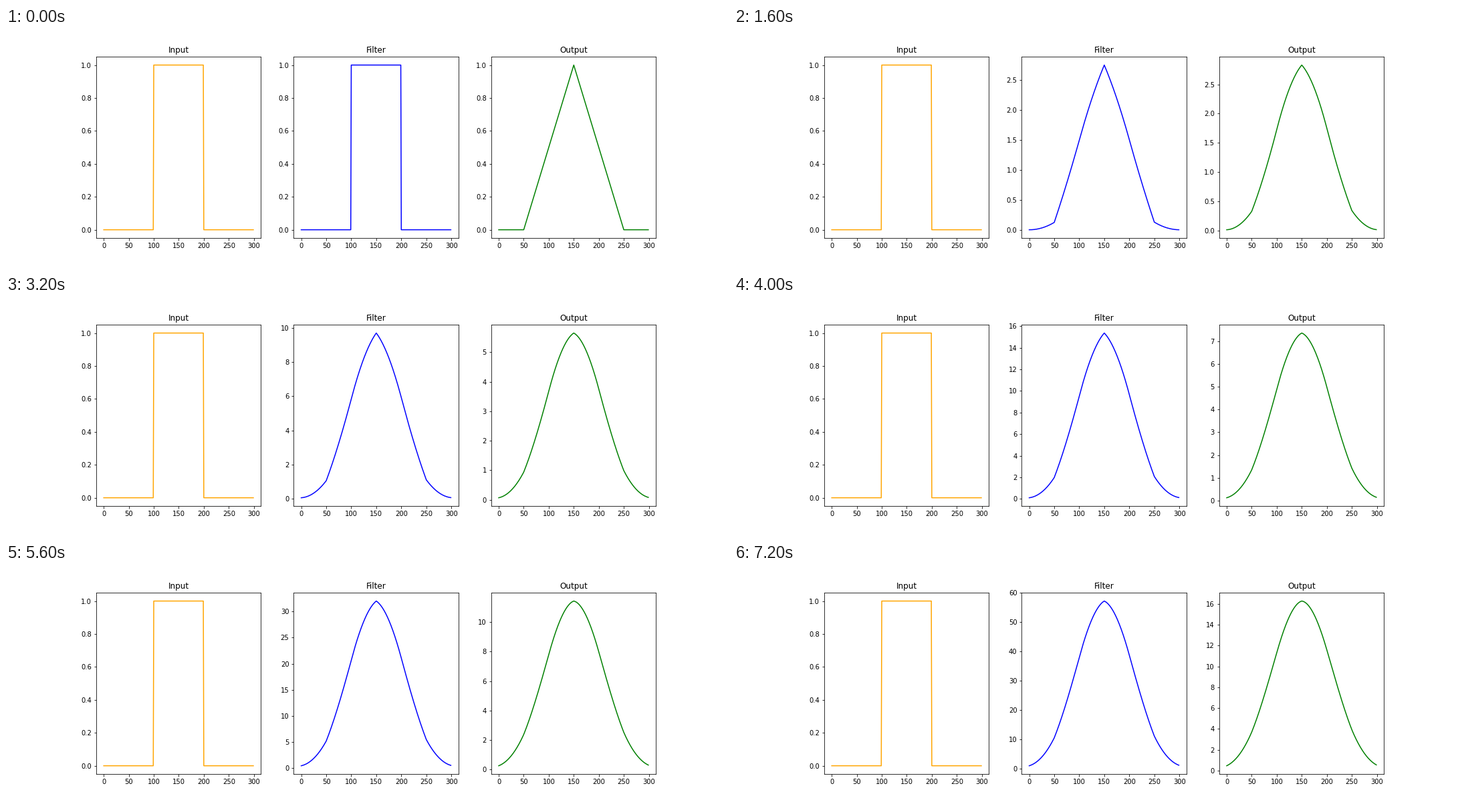
These frames come from a looping animation (1080 px wide and 360 px high, 8 s). A matplotlib script:

```python
import matplotlib.pyplot as plt
import numpy as np
from matplotlib.animation import FuncAnimation

STEPS = 10
STEP_MS = 800
SIZE = 300

plt.rcParams.update({
    "font.family": "DejaVu Sans",
    "font.size": 10,
    "figure.subplot.bottom": 0.125,
})


def build_steps(signal):
    """Return (filter, output) pairs of the accumulating convolution."""
    kernel = signal
    output = np.convolve(signal, kernel, "same") / kernel.sum()
    steps = [(kernel, output)]
    kernel = np.zeros(SIZE)
    while len(steps) < STEPS:
        kernel = kernel + output
        output = output + np.convolve(signal, kernel, "same") / output.sum()
        steps.append((kernel, output))
    return steps


x = np.arange(SIZE)
box = np.where((x >= 100) & (x < 200), 1.0, 0.0)
steps = build_steps(box)

fig, axes = plt.subplots(1, 3, figsize=(15, 5), dpi=72)
lines = []
for ax, title, color in zip(axes, ("Input", "Filter", "Output"),
                            ("orange", "blue", "green")):
    ax.set_title(title)
    lines += ax.plot(x, box, color=color)


def update(index):
    for ax, line, values in zip(axes[1:], lines[1:], steps[index]):
        line.set_ydata(values)
        ax.relim()
        ax.autoscale_view()
    return lines


animation = FuncAnimation(fig, update, frames=STEPS, interval=STEP_MS,
                          repeat=True, repeat_delay=0, blit=False)
plt.show()
```
